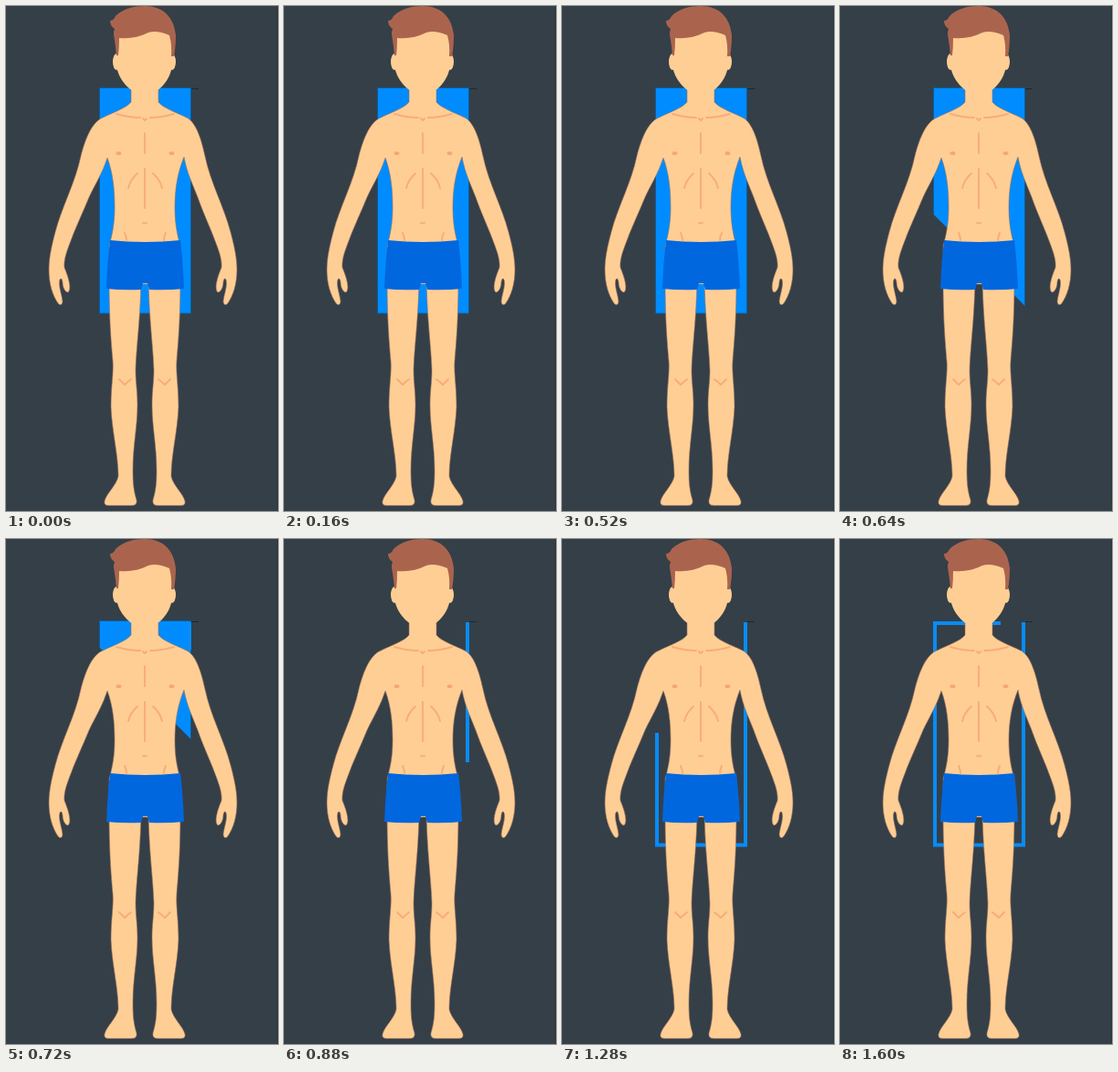
An HTML page without scripts that plays this animation: 298x552 px, repeating every 1.64 s.

```html
<!DOCTYPE html>
<html lang="en">
<head>
<meta charset="utf-8">
<title>Figure with scan frame</title>
<style>
  html, body { margin: 0; width: 100%; height: 100%; overflow: hidden; background: #353f48; }
  svg { display: block; width: 100vw; height: 100vh; }
  .skin { fill: #ffce94; }
  .outline { stroke: #96705f; stroke-width: .6; }
  .hair { fill: #aa644e; }
  .shorts { fill: #0067df; }
  .crease { fill: none; stroke: #f8ac78; stroke-width: 1.9; stroke-linecap: round; stroke-linejoin: round; }
  .dot { fill: #f5a775; }
  .panel { fill: #008cff; stroke: #075f9f; }
  .trace { fill: none; stroke: #078cf8; stroke-width: 4; stroke-dasharray: 900; animation: trace 1640ms -2ms infinite; }
  .wipe { animation: wipe 1640ms -2ms infinite; }

  /* Diagonal edge climbs from the lower left to the upper right corner */
  @keyframes wipe {
    0% { transform: translateY(240px); }
    34.146% { transform: translateY(234px); animation-timing-function: steps(7); }
    51.22%, 100% { transform: translateY(-147px); }
  }
  /* Offset is 900 minus the drawn length */
  @keyframes trace {
    0% { stroke-dashoffset: 900; animation-timing-function: step-end; }
    41.463% { stroke-dashoffset: 900; animation-timing-function: steps(5); }
    53.659% { stroke-dashoffset: 747; animation-timing-function: steps(6); }
    68.293% { stroke-dashoffset: 562; animation-timing-function: steps(4); }
    78.049% { stroke-dashoffset: 437; animation-timing-function: steps(8); }
    97.561%, 100% { stroke-dashoffset: 245; }
  }
</style>
</head>
<body>
<svg viewBox="0 0 298 552" preserveAspectRatio="none">
  <defs>
    <clipPath id="edge"><path class="wipe" d="M-400-400L700 700V-900H-400Z"/></clipPath>
    <g id="leg">
      <path class="skin outline" d="M113 300C113 340 115 365 117 388C118 402 115 415 115 438C116 465 123 490 123 514C121 524 110 533 108 541Q107 546 112 546H138Q144 546 143 540C140 530 139 522 139 508C139 480 144 460 144 436C144 420 142 412 142 398C143 370 147 345 148 300Z"/>
      <path class="crease" d="M124 408Q127 411 130 414Q133 411 137 408"/>
    </g>
    <g id="chest" class="crease">
      <path d="M121 118Q135 122 147 122"/>
      <path d="M144 183Q136 190 134 199"/>
      <path d="M130 248Q132 252 132 256"/>
      <ellipse class="dot" cx="123.5" cy="161" rx="3" ry="2" stroke="none"/>
    </g>
  </defs>

  <rect width="298" height="552" fill="#353f48"/>
  <path d="M297.500 0V552" stroke="#2b343c"/>
  <path d="M203 90.500H211" stroke="#1c2830"/>
  <g clip-path="url(#edge)"><rect class="panel" x="102.500" y="89.500" width="100" height="246.500"/></g>
  <path class="trace" d="M201 91V334.500H104V92H201"/>

  <use href="#leg"/>
  <use href="#leg" transform="matrix(-1 0 0 1 304 0)"/>

  <path class="skin outline" d="M137 85V105C131 112 120 115 106 122C94 127 87 145 82 164C76 193 61 220 54 247C50 262 47 275 47 288C47 304 51 316 57 325Q61 329 62 323C61 314 57 306 59 299Q61 296 62 302C62 308 65 313 68 313C72 309 69 298 64 286C63 277 67 267 72 254C76 243 84 226 91 209C97 196 106 182 111 166C117 182 119 200 119 220C119 236 117 248 113 262V304H191V262C187 248 185 236 185 220C185 200 188 182 195 165C198 182 205 196 210 209C216 226 224 243 228 254C233 267 237 277 236 286C231 298 228 309 232 313C235 313 238 308 238 302Q239 296 241 299C243 306 239 314 238 323Q239 329 243 325C249 316 253 304 253 288C253 275 250 262 246 247C239 220 224 193 218 164C214 145 208 127 198 122C184 115 173 112 167 105V85Z"/>
  <ellipse class="skin" cx="121" cy="61" rx="4" ry="9"/>
  <ellipse class="skin" cx="182" cy="61" rx="4" ry="9"/>
  <path class="skin" d="M121 22V64C122 80 137 97 152 97S181 80 182 64V22Z"/>
  <path class="hair" d="M114 16Q118 16 120 11C128 3 140 0 152 0C172 0 184 12 186 32Q186 45 184 55H181Q182 43 179 32C170 28 162 27 156 29C146 34 136 36 124 35Q124 46 123 54H121Q120 43 118 31Q118 27 119 25Q114 22 114 16Z"/>

  <use href="#chest"/>
  <use href="#chest" transform="matrix(-1 0 0 1 305 0)"/>
  <path class="crease" d="M150 123L152 125L154 123M152 139V161M152 178V221M150 237Q152 238 154 237"/>
  <path class="shorts" d="M114 256Q152 260 191 256Q194 280 195 309Q176 311 157 310L155 303H150L148 310Q128 311 110 309Q111 280 114 256Z"/>
</svg>
</body>
</html>
```
